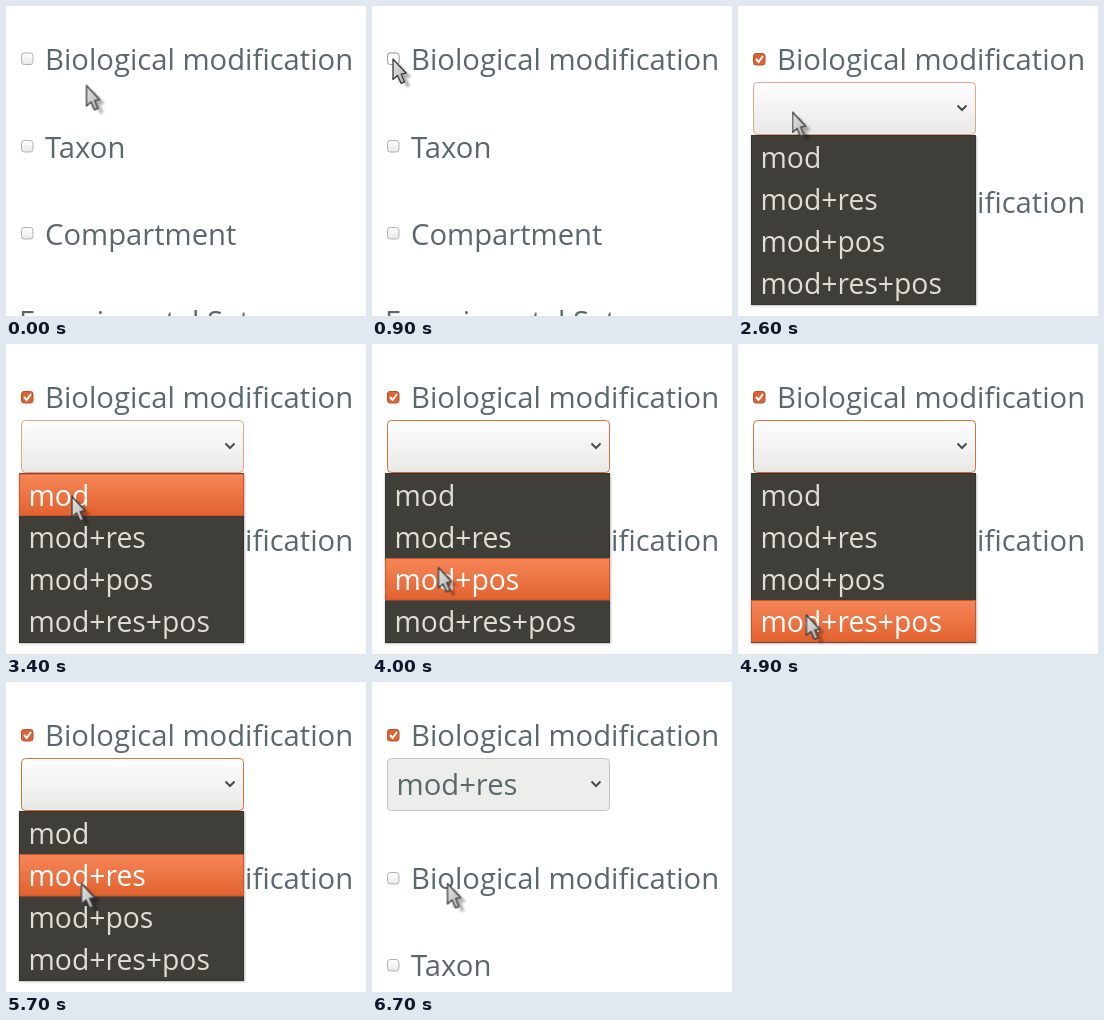
Animation of 360x310 px, one loop 8000 ms. Source, as an HTML page:

```html
<!DOCTYPE html>
<html lang="en">
<head>
<meta charset="utf-8">
<title>Checkbox and dropdown</title>
<style>
html, body { margin: 0; width: 100%; height: 100%; overflow: hidden; background: #fff; }
svg { display: block; width: 360px; height: 310px; }
text { font: 29.2px "Open Sans", "Noto Sans", sans-serif; fill: #5a686d; }
.menu text { font-size: 28.3px; fill: inherit; }

[class] { animation: 8s step-end infinite; }
.before { animation-name: before; }
.after { animation-name: after; visibility: hidden; }
.hover { animation-name: hover; opacity: 0; }
.focus { animation-name: focus; opacity: 0; }
.lit { animation-name: lit; opacity: 0; }
.edge { animation-name: edge; }
.value { animation-name: value; opacity: 0; }
.menu { animation-name: menu; opacity: 0; }
.hot { opacity: 0; }
.cursor { animation-name: cursor; }

/* 1% = 80 ms */
@keyframes before { 0% { visibility: visible } 17.5%, 100% { visibility: hidden } }
@keyframes after { 0% { visibility: hidden } 17.5%, 100% { visibility: visible } }
@keyframes hover { 0% { opacity: 0 } 11.25% { opacity: 1 } 17.5%, 100% { opacity: 0 } }
@keyframes focus { 0% { opacity: 0 } 17.5% { opacity: 1 } 30%, 100% { opacity: 0 } }
@keyframes lit { 0% { opacity: 0 } 25% { opacity: 1 } 81.25%, 100% { opacity: 0 } }
@keyframes edge {
  0% { stroke: #c3c3c0 }
  25% { stroke: #a4a49f }
  30% { stroke: #e3a58a }
  43.75% { stroke: #d6703f }
  81.25%, 100% { stroke: #c3c3c0 }
}
@keyframes value { 0% { opacity: 0 } 81.25%, 100% { opacity: 1 } }
@keyframes menu { 0% { opacity: 0 } 30% { opacity: 1 } 81.25%, 100% { opacity: 0 } }
@keyframes row1 { 0% { opacity: 0 } 40% { opacity: 1 } 45%, 100% { opacity: 0 } }
@keyframes row2 { 0% { opacity: 0 } 45% { opacity: 1 } 50% { opacity: 0 } 70%, 100% { opacity: 1 } }
@keyframes row3 { 0% { opacity: 0 } 50% { opacity: 1 } 55% { opacity: 0 } 63.75% { opacity: 1 } 70%, 100% { opacity: 0 } }
@keyframes row4 { 0% { opacity: 0 } 55% { opacity: 1 } 63.75%, 100% { opacity: 0 } }
@keyframes cursor {
  0% { transform: translate(80.5px, 79.5px) }
  1.25% { transform: translate(80.5px, 79.5px); animation-timing-function: steps(9, start) }
  12.5% { transform: translate(21px, 53px) }
  23.75% { transform: translate(21px, 53px); animation-timing-function: steps(3, start) }
  27.5% { transform: translate(54.5px, 106px) }
  36.25% { transform: translate(54.5px, 106px); animation-timing-function: steps(6, start) }
  43.75% { transform: translate(66px, 152.5px); animation-timing-function: steps(6, start) }
  51.25% { transform: translate(66.5px, 223.5px); animation-timing-function: steps(6, start) }
  58.75% { transform: translate(67.5px, 279.5px) }
  61.25% { transform: translate(67.5px, 279.5px); animation-timing-function: steps(9, start) }
  72.5%, 100% { transform: translate(75.5px, 201.5px) }
}
</style>
</head>
<body>
<svg viewBox="0 0 360 310">
  <defs>
    <linearGradient id="silver" x2="0" y2="1">
      <stop stop-color="#fefefe"/><stop offset="1" stop-color="#e8e8e6"/>
    </linearGradient>
    <linearGradient id="orange" x2="0" y2="1">
      <stop stop-color="#f68658"/><stop offset="1" stop-color="#e1622f"/>
    </linearGradient>
    <linearGradient id="steel" x2="1" y2="1">
      <stop stop-color="#e4e4e4"/><stop offset="1" stop-color="#b4b4b4"/>
    </linearGradient>
    <filter id="soft" x="-50%" y="-50%" width="200%" height="200%"><feGaussianBlur stdDeviation="1.3"/></filter>
    <rect id="box" x="15.5" y="-17" width="11.5" height="11.5" rx="2.8" fill="url(#silver)" stroke="#b1b1ae"/>
    <rect id="bar" x="13.5" width="224" height="41.5" fill="url(#orange)" stroke="#c9562a"/>
    <path id="arrow" d="M0 0V20.5L4.6 16.4L8.2 24.4L11.6 22.9L8.1 15.1L13.2 14.2Z"/>
  </defs>

  <text x="39" y="64">Biological modification</text>

  <g class="before">
    <use href="#box" y="64"/>
    <use href="#box" y="151.5"/><text x="39" y="152">Taxon</text>
    <use href="#box" y="238.5"/><text x="39" y="239">Compartment</text>
    <text x="13" y="326">Experimental Setup</text>
  </g>
  <rect class="hover" x="15.5" y="47" width="11.5" height="11.5" rx="2.8" fill="#fff" stroke="#a0a09c"/>

  <g class="after">
    <rect x="15.5" y="47.5" width="11.5" height="11.5" rx="2.5" fill="#dc6434" stroke="#b5532c"/>
    <path d="M18 53l2.6 3L25 50" fill="none" stroke="#fff" stroke-width="2"/>
    <use href="#box" y="207.5"/><text x="39" y="207">Biological modification</text>
    <use href="#box" y="294.5"/><text x="39" y="294">Taxon</text>
    <rect x="15.5" y="76.5" width="222" height="52" rx="4" fill="#ededeb"/>
    <rect class="lit" x="15.5" y="76.5" width="222" height="52" rx="4" fill="url(#silver)"/>
    <rect class="edge" x="15.5" y="76.5" width="222" height="52" rx="4" fill="none" stroke="#c3c3c0"/>
    <path d="M219.5 99.5l4.5 4.5l4.5-4.5" fill="none" stroke="#484c4d" stroke-width="2"/>
  </g>
  <rect class="focus" x="13.5" y="45.5" width="18.5" height="19" fill="none" stroke="#555" stroke-dasharray="1 1"/>
  <text class="value" x="24.5" y="113">mod+res</text>

  <g class="menu" fill="#e0ddd5">
    <rect x="13" y="130" width="226" height="170" fill="#000" opacity=".25" filter="url(#soft)"/>
    <rect x="13" y="129" width="225" height="170" fill="#3f3e39"/>
    <rect x="13.5" y="129.5" width="224" height="169" fill="none" stroke="#34332f"/>
    <text id="m1" x="22.5" y="162">mod</text>
    <text id="m2" x="22.5" y="204">mod+res</text>
    <text id="m3" x="22.5" y="246">mod+pos</text>
    <text id="m4" x="22.5" y="288">mod+res+pos</text>
    <g fill="#fff">
      <g class="hot" style="animation-name: row1"><use href="#bar" y="130"/><use href="#m1"/></g>
      <g class="hot" style="animation-name: row2"><use href="#bar" y="172.5"/><use href="#m2"/></g>
      <g class="hot" style="animation-name: row3"><use href="#bar" y="214.5"/><use href="#m3"/></g>
      <g class="hot" style="animation-name: row4"><use href="#bar" y="256.5"/><use href="#m4"/></g>
    </g>
  </g>

  <g class="cursor">
    <use href="#arrow" x="5.5" y="4" opacity=".3" filter="url(#soft)"/>
    <use href="#arrow" fill="url(#steel)" stroke="#3c3c3c" stroke-width="1.3" stroke-linejoin="round"/>
  </g>
</svg>
</body>
</html>
```
